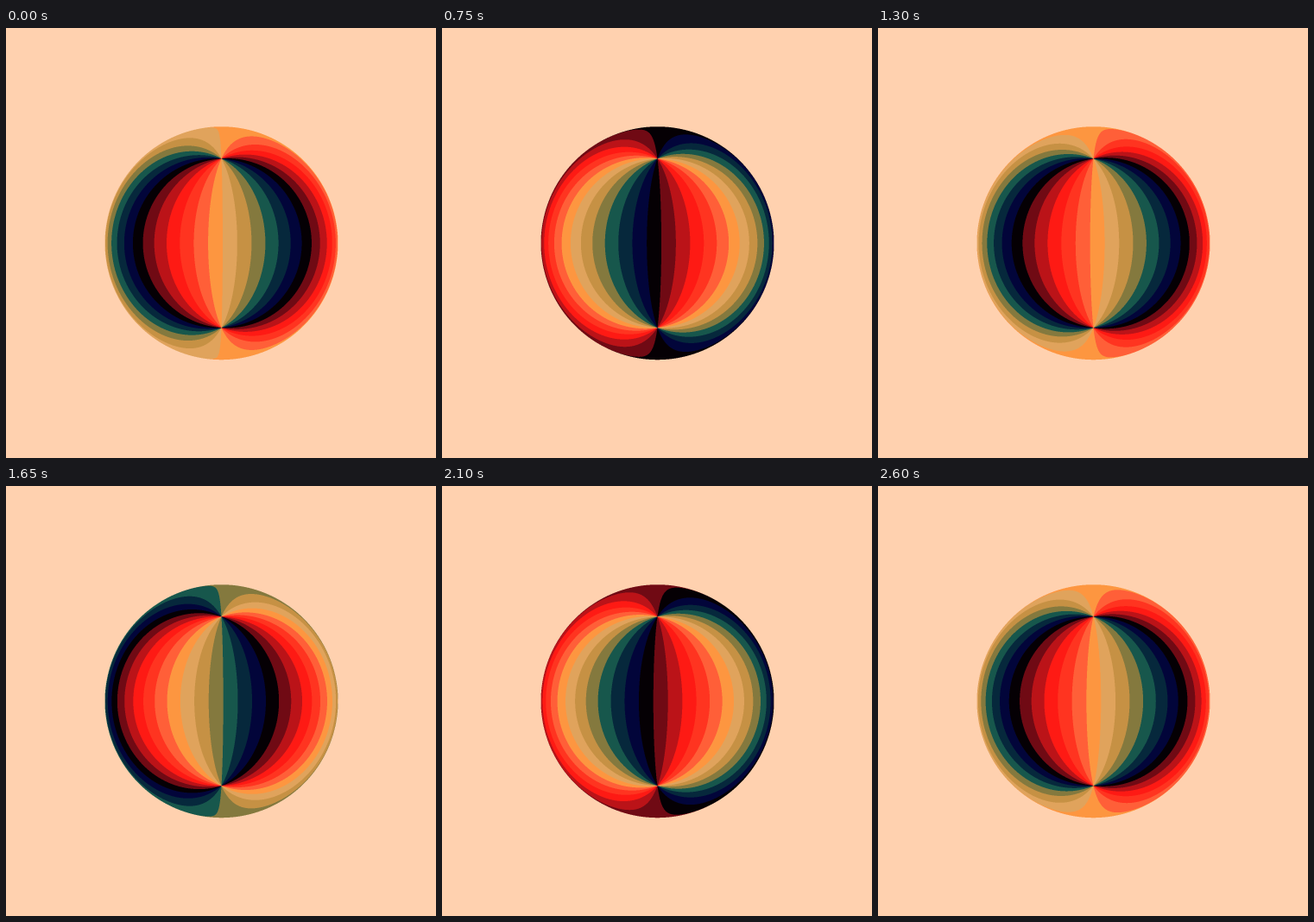
Write an HTML page with a canvas that moves like this. It is 498x498 px and loops after 2.65 s.

```html
<!DOCTYPE html>
<html lang="en">
<head>
<meta charset="utf-8">
<title>Mirror ball</title>
<style>
  html, body { margin: 0; width: 100%; height: 100%; overflow: hidden; background: #ffd1af; }
  canvas { display: block; }
</style>
</head>
<body>
<canvas id="stage" width="498" height="498"></canvas>
<script>
const SIZE = 498, CX = 249.5, CY = 249.2, R = 135;
const EYE = 13;                 // camera distance in ball radii
const LOOP = 2650, STEP = 50, SUB = 3;
const BACK = [255, 209, 175];
const BANDS = [
  '#e0a35c', '#c69144', '#84793e', '#17574c', '#06283c', '#02053a', '#050004',
  '#700a14', '#bb1318', '#fe1a14', '#ff3420', '#ff5f38', '#fd9640'
].map(hex => [1, 3, 5].map(i => parseInt(hex.substr(i, 2), 16)));
const WIDTH = 180 / BANDS.length;

// Turn of the surroundings: [ms, degrees]
const TURN = [[0, 0], [400, 50], [750, 94.4], [1300, 170.5], [1650, 221],
              [2100, 282], [2600, 354], [2650, 360]];

const ctx = document.getElementById('stage').getContext('2d');
const image = ctx.createImageData(SIZE, SIZE);

// Longitude seen in the mirror at (x, y), or NaN beside the ball
function longitude(x, y) {
  if (x * x + y * y >= 1) return NaN;
  const c = EYE * EYE - 1, k = 1 / Math.sqrt(c);
  const len = Math.hypot(x * k, y * k, 1);
  const dx = x * k / len, dy = y * k / len, dz = -1 / len;
  const b = EYE * dz;
  const t = -b - Math.sqrt(Math.max(0, b * b - c));
  const nx = dx * t, ny = dy * t, nz = EYE + dz * t;
  const dot = 2 * (dx * nx + dy * ny + dz * nz);
  return Math.atan2(dx - dot * nx, dz - dot * nz) * 180 / Math.PI;
}

const pixels = [];
for (let py = 0; py < SIZE; py++) {
  for (let px = 0; px < SIZE; px++) {
    const at = (py * SIZE + px) * 4;
    image.data.set([...BACK, 255], at);
    if (Math.hypot(px + 0.5 - CX, py + 0.5 - CY) > R + 1) continue;
    const rays = new Float32Array(SUB * SUB);
    for (let s = 0; s < rays.length; s++) {
      const sx = px + (s % SUB + 0.5) / SUB;
      const sy = py + (Math.floor(s / SUB) + 0.5) / SUB;
      rays[s] = longitude((sx - CX) / R, (sy - CY) / R);
    }
    pixels.push({ at, rays });
  }
}

function turnAt(ms) {
  const i = TURN.findIndex(key => key[0] > ms);
  const [t0, a0] = TURN[i - 1], [t1, a1] = TURN[i];
  return a0 + (a1 - a0) * (ms - t0) / (t1 - t0);
}

function draw(ms) {
  const shift = turnAt(ms) - 1.2 + 360;
  for (const { at, rays } of pixels) {
    let r = 0, g = 0, b = 0;
    for (const lon of rays) {
      const col = lon === lon
        ? BANDS[Math.floor((lon + shift) / WIDTH) % BANDS.length]
        : BACK;
      r += col[0]; g += col[1]; b += col[2];
    }
    image.data[at] = r / rays.length;
    image.data[at + 1] = g / rays.length;
    image.data[at + 2] = b / rays.length;
  }
  ctx.putImageData(image, 0, 0);
}

let start = null, shown = -1;
function tick() {
  const now = performance.now();
  if (start === null) start = now;
  const ms = Math.floor((now - start) % LOOP / STEP) * STEP;
  if (ms !== shown) draw(shown = ms);
  requestAnimationFrame(tick);
}
tick();
</script>
</body>
</html>
```
